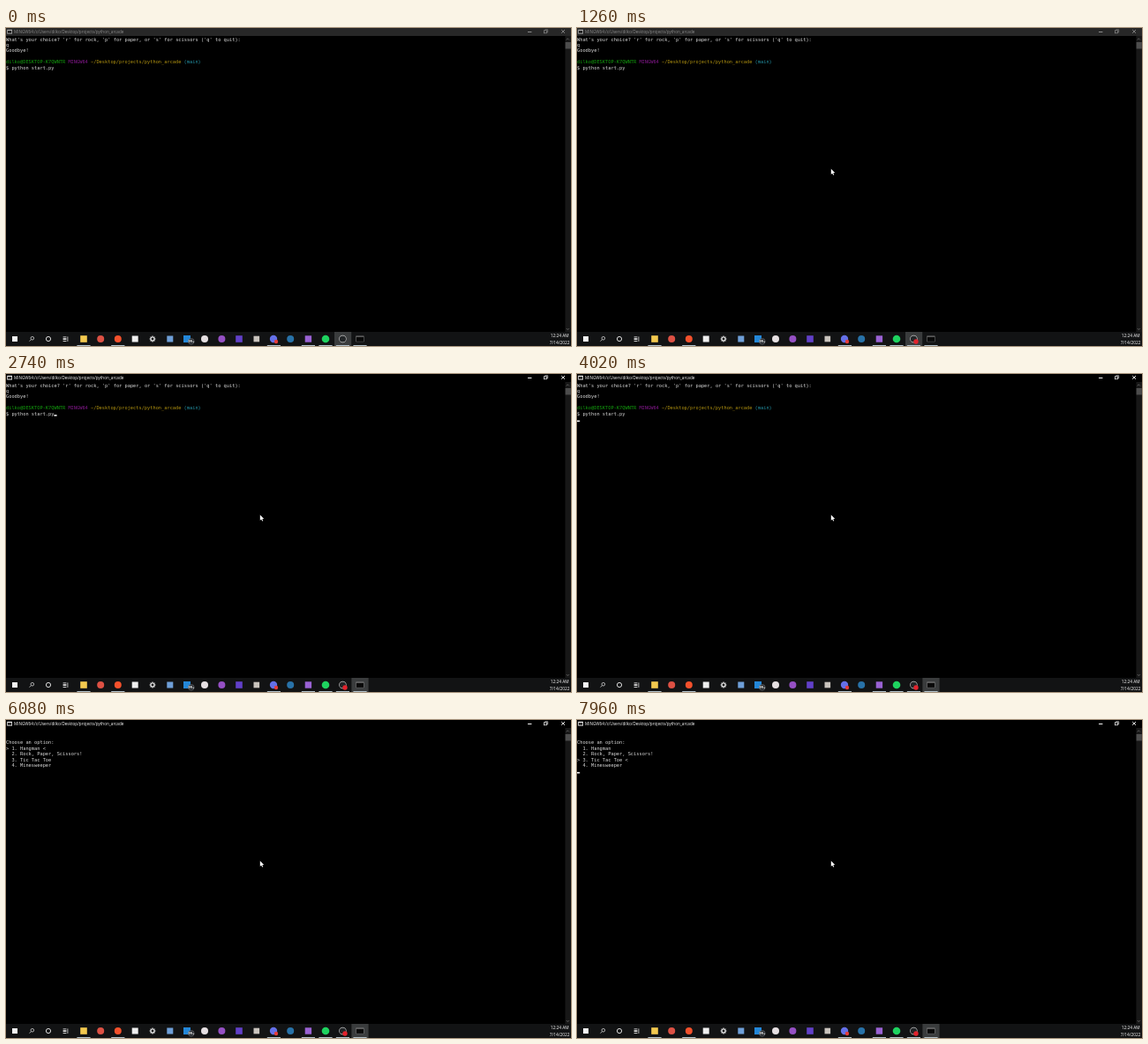
Recreate the animation shown at these times as an HTML page with a canvas. Size 640x360 px, loop 8000 ms.

```html
<!DOCTYPE html>
<html lang="en">
<head>
<meta charset="utf-8">
<title>Terminal arcade</title>
<style>
  html, body { margin: 0; width: 100%; height: 100%; overflow: hidden; background: #000; }
  canvas { display: block; width: 640px; height: 360px; }
</style>
</head>
<body>
<canvas id="stage" width="640" height="360"></canvas>
<script>
const ctx = document.getElementById('stage').getContext('2d');
const LOOP = 8000;
const MONO = '13.3px "DejaVu Sans Mono", monospace';
const UI = '"Open Sans", sans-serif';
const CELL = 3.2, ROW = 6.4, TOP = 9.6;
const GREY = '#dadada';

// Moments of the session, in ms
const RECORD = 240, FOCUS = 1400, ENTER = 3120, MENU = 4140, SECOND = 6500, THIRD = 7220;
const BLINKS = [[1400, 1700], [2240, ENTER], [ENTER, MENU], [MENU, 5200], [6260, LOOP]];

const USER = 'dilko', HOST = 'DESKTOP-K7QWNTR';
const GAMES = ['Hangman', 'Rock, Paper, Scissors!', 'Tic Tac Toe', 'Minesweeper'];

function rect(x, y, w, h, color) {
  ctx.fillStyle = color;
  ctx.fillRect(x, y, w, h);
}

function disc(x, y, r, color) {
  ctx.fillStyle = color;
  ctx.beginPath();
  ctx.arc(x, y, r, 0, 7);
  ctx.fill();
}

function ring(x, y, r, color, width) {
  ctx.strokeStyle = color;
  ctx.lineWidth = width;
  ctx.beginPath();
  ctx.arc(x, y, r, 0, 7);
  ctx.stroke();
}

function path(points, color, fill, width = 0.7) {
  ctx.beginPath();
  points.forEach(([x, y]) => ctx.lineTo(x, y));
  ctx.lineWidth = width;
  ctx.fillStyle = ctx.strokeStyle = color;
  if (fill) ctx.fill(); else ctx.stroke();
}

// Text is set on a 1600 x 900 desktop shown at 40 %
function text(str, x, y, font, color, align = 'left') {
  ctx.save();
  ctx.translate(x, y);
  ctx.scale(0.4, 0.4);
  ctx.font = font;
  ctx.textAlign = align;
  ctx.textBaseline = 'alphabetic';
  ctx.fillStyle = color;
  ctx.fillText(str, 0, 0);
  ctx.restore();
}

function print(row, str, col = 0, color = GREY) {
  text(str, col * CELL, TOP + row * ROW + 5, MONO, color);
}

function titleBar(active) {
  const ink = active ? '#fff' : '#8c8c8c';
  rect(0, 0, 640, 9, active ? '#000' : '#272727');
  rect(1.2, 1.8, 5.8, 4.8, active ? '#e4e4e4' : '#a8a8a8');
  rect(2, 3.2, 4.2, 2.4, '#111');
  text(`MINGW64:/c/Users/${USER}/Desktop/projects/python_arcade`, 9, 6.1, '500 11.5px ' + UI, ink);
  rect(591, 4, 4.4, 1, ink);
  ctx.strokeStyle = ink;
  ctx.lineWidth = 0.7;
  ctx.strokeRect(609.6, 2.8, 3, 3);
  path([[610.8, 2.6], [610.8, 1.8], [613.7, 1.8], [613.7, 4.8], [612.8, 4.8]], ink, false, 0.6);
  path([[629.2, 2], [633, 5.8]], ink, false, 0.9);
  path([[633, 2], [629.2, 5.8]], ink, false, 0.9);
}

function scrollBar() {
  rect(633.4, 9, 6.6, 335, '#171717');
  rect(633.6, 16, 6.2, 7.5, '#4d4d4d');
  path([[634.8, 13.4], [636.3, 11.8], [637.8, 13.4]], '#777');
  path([[634.8, 340], [636.3, 341.6], [637.8, 340]], '#777');
}

function shell() {
  print(0, "What's your choice? 'r' for rock, 'p' for paper, or 's' for scissors ('q' to quit):");
  print(1, 'q');
  print(2, 'Goodbye!');
  print(4, `${USER}@${HOST}`, 0, '#13a10e');
  print(4, 'MINGW64', 22, '#86198f');
  print(4, '~/Desktop/projects/python_arcade', 30, '#b39410');
  print(4, '(main)', 63, '#2495a8');
  print(5, '$ python start.py');
}

function menu(choice) {
  print(2, 'Choose an option:');
  GAMES.forEach((name, i) => {
    const line = `${i + 1}. ${name}`;
    print(3 + i, i === choice ? `> ${line} <` : `  ${line}`);
  });
}

function cursor(t) {
  if (!BLINKS.some(([on, off]) => t >= on && t < off)) return;
  const [col, row] = t < ENTER ? [17, 5] : t < MENU ? [0, 6] : [0, 7];
  rect(col * CELL, TOP + row * ROW + 4.5, CELL, 1.6, '#f0f0f0');
}

function gear(x, y) {
  for (let i = 0; i < 8; i++) {
    const a = i * Math.PI / 4, c = Math.cos(a), s = Math.sin(a);
    path([[x + 2 * c, y + 2 * s], [x + 3.4 * c, y + 3.4 * s]], '#eee', false, 1.1);
  }
  ring(x, y, 2, '#eee', 1.1);
}

function square(x, size, color) {
  rect(x - size / 2, 352 - size / 2, size, size, color);
}

function taskbar(t) {
  const focused = t >= FOCUS, y = 352;
  rect(0, 344, 640, 16, '#121314');
  rect(focused ? 391.4 : 372, 344, 19.2, 16, '#3a3c3d');

  square(10, 6, '#f4f4f4');
  ring(29.8, 351.2, 1.8, '#eee', 0.7);
  path([[28.5, 352.6], [26.6, 354.6]], '#eee');
  ring(48, y, 2.6, '#f0f0f0', 0.9);
  rect(64.6, 349.4, 3.8, 0.9, '#ddd');
  rect(64.6, 351.2, 3.8, 1.8, '#ddd');
  rect(64.6, 354, 3.8, 0.9, '#ddd');
  rect(69.5, 349.4, 0.8, 5.5, '#ddd');

  square(88, 7.6, '#f3c94f');
  disc(107.2, y, 4, '#dd5144');
  disc(126.8, y, 4, '#f4512c');
  square(146.2, 7, '#eeeeee');
  gear(166, y);
  square(185.8, 7, '#6f9fd8');
  square(205, 8, '#2387d8');
  disc(225, y, 4, '#e6e0e2');
  disc(244.4, y, 4, '#9550c4');
  square(264, 7.6, '#6140c8');
  square(283.8, 6.6, '#c9c3bd');
  disc(303, y, 4.2, '#6470e8');
  disc(322.2, y, 4, '#2872a8');
  square(342.4, 7.4, '#9a62d4');
  disc(362, y, 4.3, '#1ed25f');
  disc(381.4, y, 4.2, '#c9c9c9');
  disc(381.4, y, 3.6, '#222527');
  rect(396.4, 348.6, 9, 6.6, '#8f8f8f');
  rect(396.8, 349.6, 8.2, 5.3, '#090909');

  disc(209.8, 354.8, 3.3, '#202428');
  ring(209.8, 354.8, 3.3, '#8a8f93', 0.5);
  text('99+', 209.8, 356.4, 'bold 10px ' + UI, '#fff', 'center');
  disc(306, 355, 2.2, '#e53c3c');
  if (t >= RECORD) disc(384, 355, 2.7, '#e3222c');

  for (const x of [88, 126.8, 303.4, 342.4, 362, 381.4, 401])
    rect(x - 7.6, 359, 15.2, 1, '#b5c3cc');

  text('12:24 AM', 627.2, 350.2, '500 12px ' + UI, '#fff', 'center');
  text('7/14/2022', 627.2, 357.7, '500 12px ' + UI, '#fff', 'center');
}

function pointer(t) {
  if (t < RECORD) return;
  const p = Math.min(1, (t - RECORD) / 800);
  const k = p * p * (3 - 2 * p);
  const shape = [[0, 0], [0, 6.3], [1.4, 5], [2.4, 7.2], [3.4, 6.8], [2.5, 4.7], [4.4, 4.7]];
  ctx.save();
  ctx.translate(383 + (287.8 - 383) * k, 351 + (159.4 - 351) * k);
  path(shape, '#fff', true);
  ctx.restore();
}

function draw(t) {
  rect(0, 0, 640, 360, '#000');
  titleBar(t >= FOCUS);
  scrollBar();
  if (t < MENU) shell();
  else menu(t < SECOND ? 0 : t < THIRD ? 1 : 2);
  cursor(t);
  taskbar(t);
  pointer(t);
}

const start = performance.now();
function tick() {
  draw((performance.now() - start) % LOOP);
  requestAnimationFrame(tick);
}
tick();
</script>
</body>
</html>
```
